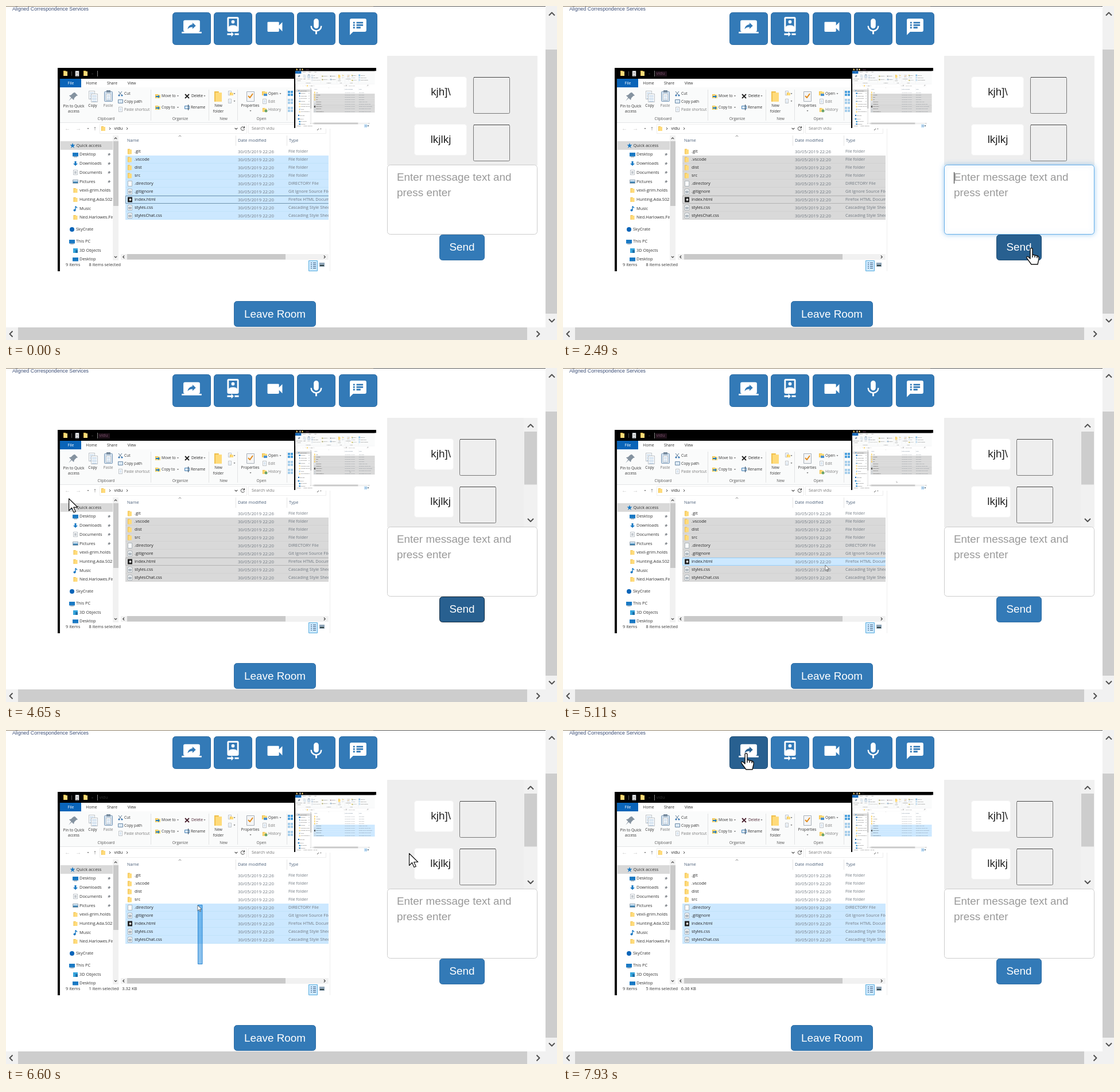
An HTML page with a canvas for the animation above (8000 ms loop, 960 by 583 pixels).

```html
<!DOCTYPE html>
<html lang="en">
<head>
<meta charset="utf-8">
<title>Room</title>
<style>
html, body { margin: 0; width: 100%; height: 100%; overflow: hidden; background: #fff; }
canvas { display: block; }
</style>
</head>
<body>
<canvas id="stage" width="960" height="583"></canvas>
<script>
const LOOP = 8000;
const PREVIEW_LEAD = 700; // the small preview runs ahead of the streamed picture
const ctx = document.getElementById('stage').getContext('2d');
const UI = '"Open Sans", "Noto Sans", sans-serif';
const WEB = '"Liberation Sans", Arial, sans-serif';

// Pointer paths: time, x, y
const pointerPaths = [
  [[80, 548, 540], [300, 690, 500], [500, 790, 425], [650, 775, 370], [840, 741, 335],
   [1250, 741, 335], [1720, 830, 345], [2000, 872, 362], [2300, 835, 405], [2490, 816, 423],
   [2850, 816, 423], [3100, 780, 440], [3460, 715, 449], [3590, 707, 458], [3830, 699, 461],
   [4070, 694, 458], [4400, 330, 330], [4720, 49, 200]],
  [[6530, 640, 285], [6600, 702, 216], [6750, 784, 140], [6950, 700, 70], [7150, 560, 40],
   [7300, 430, 40], [7410, 380, 42], [7700, 325, 45], [7930, 319, 41], [8000, 319, 41]]
];
const streamPath = [[4950, 510, 322], [5110, 457, 344], [5400, 430, 352], [5810, 370, 412],
  [5980, 342, 409], [6100, 341, 409], [6550, 335, 306], [6650, 333, 306], [6900, 333, 306]];

function along(path, t) {
  const i = path.findIndex(k => k[0] > t);
  if (i < 1) return null;
  const [t0, x0, y0] = path[i - 1], [t1, x1, y1] = path[i];
  const p = (t - t0) / (t1 - t0);
  return { x: x0 + (x1 - x0) * p, y: y0 + (y1 - y0) * p };
}

function rect(x, y, w, h, fill) {
  ctx.fillStyle = fill;
  ctx.fillRect(x, y, w, h);
}

function box(x, y, w, h, fill, stroke, radius = 0, width = 1) {
  ctx.beginPath();
  ctx.roundRect(x + .5, y + .5, w - 1, h - 1, radius);
  if (fill) { ctx.fillStyle = fill; ctx.fill(); }
  if (stroke) { ctx.strokeStyle = stroke; ctx.lineWidth = width; ctx.stroke(); }
}

function disc(x, y, r, fill) {
  ctx.fillStyle = fill;
  ctx.beginPath();
  ctx.arc(x, y, r, 0, 7);
  ctx.fill();
}

function text(s, x, y, size, color, align = 'left', family = UI) {
  ctx.font = `${size}px ${family}`;
  ctx.fillStyle = color;
  ctx.textAlign = align;
  ctx.textBaseline = 'middle';
  ctx.fillText(s, x, y);
}

function shape(d, x, y, { scale = 1, sy = scale, fill, stroke, width = 1 }) {
  const path = new Path2D(d);
  ctx.save();
  ctx.translate(x, y);
  ctx.scale(scale, sy);
  ctx.lineJoin = 'round';
  ctx.lineWidth = width;
  if (fill) { ctx.fillStyle = fill; ctx.fill(path, 'evenodd'); }
  if (stroke) { ctx.strokeStyle = stroke; ctx.stroke(path); }
  ctx.restore();
}

const CHEVRON = { up: 'M-1 .5L0-.5 1 .5', down: 'M-1-.5L0 .5 1-.5', left: 'M.5-1L-.5 0 .5 1', right: 'M-.5-1L.5 0-.5 1' };
const chevron = (dir, x, y, r, color = '#505050', weight = 2) =>
  shape(CHEVRON[dir], x, y, { scale: r, stroke: color, width: weight / r });
const caret = (x, y) => shape('M-1.5-.8h3L0 1z', x, y, { fill: '#555' });

function folder(x, y, w = 7, h = 8) {
  rect(x, y, w * .6, h, '#f0c04c');
  rect(x + w * .15, y + h * .12, w * .85, h * .88, '#ffdb7a');
}

function sheet(x, y, w = 7, h = 9, lines = '#8db4d8') {
  box(x, y, w, h, '#fff', '#a0a8b0', 0, .7);
  for (let i = 3; i < h - 1; i += 2.5) rect(x + 2, y + i, w - 4, .7, lines);
}

// ---------- file window ----------
const FILES = [
  ['.git', 'File folder'], ['.vscode', 'File folder'], ['dist', 'File folder'], ['src', 'File folder'],
  ['.directory', 'DIRECTORY File'], ['.gitignore', 'Git Ignore Source File'],
  ['index.html', 'Firefox HTML Document'], ['styles.css', 'Cascading Style Sheet'],
  ['stylesChat.css', 'Cascading Style Sheet']
];
const PLACES = [
  ['Desktop', 259, 'screen'], ['Downloads', 275, 'down'], ['Documents', 290.5, 'sheet'], ['Pictures', 306.5, 'picture'],
  ['vexil-grim.holds', 322, 'folder'], ['Hunting.Ada.S02E0', 338, 'folder'], ['Music', 353.5, 'note'],
  ['Ned.Harlowes.Finn', 369, 'folder'], ['SkyCrate', 390, 'dot', 122], ['This PC', 411, 'screen', 122],
  ['3D Objects', 427, 'cube'], ['Desktop', 442, 'screen']
];

const BLUE = '#1979c4';
const placeIcons = {
  screen(x, y) { rect(x - 5, y - 3, 10, 6.5, BLUE); rect(x - 3, y + 3.8, 6, 1, '#789'); },
  down(x, y) { shape('M-1.5-4h3v4h2.5L0 4-4 0h2.5z', x, y, { fill: BLUE }); },
  sheet(x, y) { sheet(x - 4, y - 4.5, 8, 9, '#456'); },
  picture(x, y) { box(x - 5, y - 3.5, 10, 7, '#cfe6f7', '#789', 0, .7); rect(x - 4, y, 8, 2.5, '#3a7fae'); },
  folder(x, y) { folder(x - 3.5, y - 4); },
  note(x, y) { shape('M0-4v7M0-4l3 3', x, y, { stroke: BLUE, width: 1.4 }); disc(x - 1.5, y + 3, 2, BLUE); },
  dot(x, y) { disc(x, y, 4, '#0a64b8'); },
  cube(x, y) { rect(x - 4, y - 4, 8, 8, '#35a4dc'); rect(x, y - 1, 4, 5, '#1c6fa8'); }
};

function streamState(t) {
  const focused = t < 150 || t > 5850;
  const drag = t > 5980 && t < 6900 ? along(streamPath, t) : null;
  let first = 1;
  if (t > 5850) first = t > 6550 ? 4 : drag ? Math.max(4, Math.floor((drag.y - 247) / 14)) : 9;
  let status = '8 items selected';
  if (t > 5850) status = t < 6250 ? '' : t < 7000 ? '1 item selected   3.32 KB' : '5 items selected   6.36 KB';
  return { focused, drag, first, status, hover: t > 4950 && t < 5300, cursor: along(streamPath, t) };
}

function drawRibbon(state) {
  rect(94, 142, 520, 61, '#fafbfb');
  rect(94, 203, 520, 1, '#e3e5e7');
  rect(94, 127, 37, 15, '#0a64b8');
  text('File', 113, 135, 6.8, '#fff', 'center');
  [['Home', 149], ['Share', 185], ['View', 219]].forEach(([s, x]) => text(s, x, 135, 6.8, '#333', 'center'));
  [252, 353, 403, 489].forEach(x => rect(x, 146, 1, 54, '#e2e3e4'));
  const label = (s, x, y, color = '#333', align = 'center') => text(s, x, y, 6.6, color, align);
  const item = (s, x, y, color) => label(s, x, y, color, 'left');

  shape('M2-8l6 6-3 1-4 4-1 4-4-4-6 6 5-7-4-4 4-1 4-4z', 118, 158, { scale: .9, fill: '#8593a0' });
  label('Pin to Quick', 118, 175);
  label('access', 118, 184);
  sheet(144, 148, 11, 15);
  sheet(148, 153, 12, 15);
  label('Copy', 151, 174.5);
  box(171, 149, 15, 18, '#d3e2f0', '#7896b4', 1);
  rect(175, 147, 7, 4, '#7a8da0');
  sheet(174, 153, 9, 12);
  label('Paste', 178, 174.5, '#777');
  shape('M-3-4L2 2M3-4L-2 2', 199, 153, { stroke: '#5d7a94' });
  disc(197, 156, 1.6, '#3b78b4');
  disc(202, 156, 1.6, '#3b78b4');
  item('Cut', 206, 153);
  box(195, 163, 9, 7, '#dce9f5', '#6d8ba8');
  item('Copy path', 206, 167);
  sheet(196, 176, 7, 9);
  item('Paste shortcut', 206, 181, '#777');
  label('Clipboard', 174.5, 197, '#555');

  [['Move to', 157], ['Copy to', 177]].forEach(([s, y]) => {
    folder(260, y - 3, 9, 7);
    shape('M-3 0h4v-2l3 3-3 3v-2h-4z', 264, y, { fill: BLUE });
    item(s, 271, y);
    caret(299.5, y);
  });
  const cross = state.focused && state.first > 1 ? '#4a2230' : '#222';
  shape('M-3.5-3.5l7 7M3.5-3.5l-7 7', 315.5, 157.5, { stroke: cross, width: 1.8 });
  item('Delete', 323, 157, cross);
  caret(346, 157);
  box(311, 174, 9, 6, '#d7e8f7', '#4b83b4');
  rect(317, 172, 1, 10, '#345');
  item('Rename', 322, 177);
  label('Organize', 303.5, 197, '#555');

  folder(363, 149, 13, 18);
  label('New', 370, 174.5);
  label('folder', 370, 184);
  sheet(387, 148, 6, 8); folder(390, 151, 6, 5); caret(398, 153);
  sheet(387, 162, 6, 8); caret(398, 166);
  label('New', 379, 197, '#555');
  box(419, 149, 14, 18, '#f4f5f6', '#a8b0b8');
  shape('M-4 0l3 3 5-7', 426, 157, { stroke: '#e28a1c', width: 2 });
  label('Properties', 425.5, 174.5);
  caret(426, 183);
  folder(446, 149, 9, 7); rect(449, 153, 6, 4, '#4a90cf');
  item('Open', 457, 153); caret(478, 153);
  sheet(447, 162, 7, 9); item('Edit', 457, 167, '#777');
  folder(447, 178, 7, 7); disc(453, 183, 2.5, '#6ba36b'); item('History', 457, 181.5, '#777');
  label('Open', 445, 197, '#555');
  for (let i = 0; i < 12; i++)
    rect(491 + i % 2 * 5, 148 + (i >> 1) % 2 * 5 + (i >> 2) * 14, 4, 4, i < 4 ? '#4ba0dd' : '#a5cdea');
  item('Select all', 503, 153);
  item('Select none', 503, 167);
  item('Invert selection', 503, 181);
}

function drawPlaces() {
  rect(95, 236, 91, 15, '#d9d9d9');
  shape('M0-5l1.3 3.6H5L2 1l1.2 4L0 2.5-3.2 5-2 1l-3-2.4h3.7z', 116, 243.5, { scale: .9, fill: BLUE });
  ctx.save();
  ctx.beginPath();
  ctx.rect(94, 225, 92, 221);
  ctx.clip();
  text('Quick access', 122.5, 244, 7.4, '#333');
  PLACES.forEach(([name, y, icon, x = 128], i) => {
    placeIcons[icon](x - 7, y);
    text(name, x, y + .5, 7.4, '#333');
    if (i < 4) shape('M0-3l3 3-2 1-1 2-1.5-1.5L-4 4l2-3-1.5-1.5 2-1z', 180, y, { scale: .8, fill: '#8a8f94' });
  });
  ctx.restore();
  rect(186, 226, 10, 218, '#f1f1f1');
  rect(187, 236, 9, 113, '#c9c9c9');
  chevron('up', 191, 231, 2.2, '#444', 1.2);
  chevron('down', 191, 438, 2.2, '#444', 1.2);
}

function drawFiles(state) {
  text('Name', 211, 235, 7.4, '#4c607a');
  text('Date modified', 404, 235, 7.5, '#4c607a');
  text('Type', 493, 235, 7.4, '#4c607a');
  chevron('up', 303, 227, 2.2, '#888', 1);
  rect(400, 226, 1, 18, '#e5e5e5');
  rect(489, 226, 1, 18, '#e5e5e5');
  FILES.forEach(([name, kind], i) => {
    const y = 254 + i * 14;
    if (i >= state.first) {
      rect(208, y - 7, 390, 14, state.focused ? '#cce8ff' : '#d9d9d9');
      rect(208, y + 6.5, 390, .5, state.focused ? '#b5daf5' : '#c8c8c8');
    }
    if (i === 6 && state.hover) box(208, y - 7, 390, 14, '#cce8ff', '#99d1ff');
    else if (i === 6 && state.first === 1)
      box(208, y - 7, 390, 14, null, state.focused ? '#6f93ad' : '#b4b4b4');
    if (i < 4) folder(212, y - 4.5, 7, 9);
    else if (i === 6) { rect(212, y - 4.5, 8, 9, '#222'); disc(216.5, y, 2, '#ddd'); }
    else {
      box(212, y - 5, 8, 10, '#fff', '#9aa5ad', 0, .8);
      if (i > 4) { disc(216, y + .5, 2.3, '#7b8b98'); disc(216, y + .5, 1, '#fff'); }
    }
    text(name, 224, y + .5, 7.4, '#222');
    text(`30/05/2019 22:2${i ? 0 : 6}`, 404, y + .5, 7.75, '#707880');
    text(kind, 492, y + .5, 7.4, '#707880');
  });
  rect(200, 433, 362, 10, '#f1f1f1');
  rect(211, 433, 276, 9.5, '#c9c9c9');
  chevron('left', 205, 438, 2.4, '#444', 1.2);
  chevron('right', 555, 438, 2.4, '#444', 1.2);
}

function drawWindow(t, right) {
  const state = streamState(t);
  ctx.save();
  ctx.beginPath();
  ctx.rect(90, 108, 555, 19);
  ctx.rect(90, 108, right - 90, 355);
  ctx.clip();
  rect(90, 108, 555, 355, '#fff');
  rect(90, 108, 4, 355, '#0b0b0b');
  rect(90, 108, 555, 19, '#000');
  folder(100, 113, 7, 9);
  rect(114, 114, 1, 8, '#555');
  sheet(120.5, 113, 7, 10, '#333');
  folder(135, 113, 7, 9);
  rect(149, 118, 3, 1, '#333');
  rect(159, 113, 1, 10, '#888');
  if (!state.focused) rect(161, 114, 20, 9, '#20121b');
  if (t > 100) text('vidu', 162.5, 118, 7.6, state.focused ? '#303030' : '#765069');

  drawRibbon(state);
  text('←', 107, 214, 10, '#c5c5c5', 'center');
  text('→', 126, 214, 10, '#c5c5c5', 'center');
  caret(143, 214);
  text('↑', 155, 214, 10, '#444', 'center');
  box(163, 206, 257, 17, null, '#ededed');
  folder(166, 210, 7, 8);
  chevron('right', 181, 214, 2, '#444', 1);
  text('vidu', 188.5, 214, 7.5, '#222');
  chevron('right', 211, 214, 2, '#444', 1);
  chevron('down', 401, 214, 2.4, '#444', 1.1);
  shape('M2.5-2A3.2 3.2 0 1 0 3 1M3-4v3H0', 412.5, 214, { stroke: '#444' });
  box(422, 206, 136, 17, null, '#ededed');
  text('Search vidu', 428, 214, 7.4, '#777');
  shape('M-4 4l4-4a2.5 2.5 0 1 1 1 1', 546, 213, { stroke: '#555' });

  drawPlaces();
  drawFiles(state);
  text('9 items', 104, 452, 7.4, '#333');
  text(state.status, 144.5, 452, 7.4, '#333');
  box(527, 444, 16, 19, '#cce8ff', '#5aaede');
  for (let y = 448; y < 460; y += 3) { rect(531, y, 2, 1, '#357'); rect(535, y, 5, 1, '#357'); }
  rect(546, 448, 9, 7, '#8fa5b8');
  rect(547, 452, 7, 2, '#344');

  if (state.drag) {
    const { x, y } = state.drag;
    box(x, y - 1, Math.max(1, 342.5 - x), Math.max(1, 410 - y), 'rgba(0,120,215,.45)', '#2b87d3');
  }
  if (state.cursor) drawArrow(state.cursor.x, state.cursor.y, .46);
  ctx.restore();
}

function drawPreview(t) {
  ctx.save();
  ctx.beginPath();
  ctx.rect(502, 108, 143, 106);
  ctx.clip();
  rect(502, 108, 143, 106, '#fff');
  ctx.translate(503, 108);
  ctx.scale(.278, .294);
  ctx.translate(-90, -108);
  drawWindow(Math.min(t + PREVIEW_LEAD, LOOP - 1), 592);
  ctx.restore();
  rect(502, 108, 2, 105, '#000');
}

// ---------- web page ----------
const ICONS = [
  'M4 4h16q2 0 2 2v10q0 2-2 2H4q-2 0-2-2V6q0-2 2-2zM0 18h24v2H0zM13 14.5v-2.2q-4 0-6 2.7 .8-5.2 6-5.9V7l4 3.7z',
  'M7 0h10q2 0 2 2v14q0 2-2 2H7q-2 0-2-2V2q0-2 2-2zM7 2v10.5q0-2.5 5-2.5t5 2.5V2zM12 4a2 2 0 0 1 0 4a2 2 0 0 1 0-4zM10 20H5v2h5v2l3-3-3-3zM14 20h5v2h-5z',
  'M4 6h12q1 0 1 1v3.5l4-4v11l-4-4V17q0 1-1 1H4q-1 0-1-1V7q0-1 1-1z',
  'M9 5a3 3 0 0 1 6 0v6a3 3 0 0 1-6 0zM6.7 11a5.3 5.1 0 0 0 10.6 0H19q-.5 6-6 6.7V21h-2v-3.3Q5.5 17 5 11z',
  'M4 2h16q2 0 2 2v12q0 2-2 2H6l-4 4V4q0-2 2-2zM6 6h2v2H6zM6 9h2v2H6zM6 12h2v2H6zM10 6h8v2h-8zM10 9h8v2h-8zM10 12h5v2h-5z'
];
const SEND = [755, 399, 79, 45];
const LEAVE = [397, 515, 143, 45];
const FIELD = [664, 277, 262, 122];
const TOOLS = ICONS.map((_, i) => [290 + Math.floor(i * 72.5), 11, 67, 57]);
const inside = (p, [x, y, w, h]) => p && p.x >= x && p.x < x + w && p.y >= y && p.y < y + h;

function button(area, dark, border = '#204d74') {
  box(...area, dark ? '#286090' : '#337ab7', dark ? border : '#2e6da4', 5);
}

function drawChat(t, pointer) {
  const scrolled = t > 2780;
  const focusIn = Math.min(1, Math.max(0, (t - 1100) / 150));
  const glow = t < 2750 ? focusIn : Math.max(0, 1 - (t - 2750) / 150);
  rect(664, 87, 262, 191, '#eee');
  ['kjh]\\', 'lkjlkj'].forEach((message, i) => {
    const y = 123 + i * 83;
    box(711, y, scrolled ? 69 : 92, 55, '#fff', '#f3f3f3', 4);
    text(message, scrolled ? 775 : 757.5, y + 28, 18.9, '#222', scrolled ? 'right' : 'center', WEB);
    const x = scrolled ? 790 : 814;
    box(x, y + 1, 64, 64, '#eee', '#777', 2);
    rect(x + 1, y + 1, 62, 1, '#444');
  });
  if (scrolled) {
    rect(902, 87, 24, 191, '#f1f1f1');
    rect(903, 111, 22, 92.5, '#cdcdcd');
    chevron('up', 914, 101, 5);
    chevron('down', 914, 265.5, 5);
  }
  ctx.save();
  ctx.shadowColor = `rgba(102,175,233,${.6 * glow})`;
  ctx.shadowBlur = 8 * glow;
  box(...FIELD, '#fff', glow > .5 ? '#66afe9' : '#ccc', 5);
  ctx.restore();
  text('Enter message text and', 681, 300, 18.9, '#999', 'left', WEB);
  text('press enter', 681, 327, 18.9, '#999', 'left', WEB);
  if (t > 1100 && t < 2750 && (t - 1100) % 1060 < 530) rect(681, 290, 1, 20, '#222');

  const sendFocused = t > 2750 && t < 4880;
  button(SEND, sendFocused || inside(pointer, SEND), sendFocused ? '#122b40' : undefined);
  text('Send', 794.5, 422, 18.9, '#fff', 'center', WEB);
}

function drawScrollbars() {
  rect(940, 0, 20, 583, '#f1f1f1');
  rect(940, 76, 20, 461, '#cdcdcd');
  chevron('up', 951, 14, 5);
  chevron('down', 951, 549, 5);
  rect(0, 561, 940, 22, '#f1f1f1');
  rect(21, 561, 887, 22, '#cdcdcd');
  chevron('left', 9, 572.5, 5);
  chevron('right', 927, 572.5, 5);
}

function drawArrow(x, y, scale = 1) {
  shape('M0 0v21l5-5 3.5 8 3.2-1.4L8.2 15h7z', x, y, { scale, fill: '#fff', stroke: '#111', width: 1.2 });
}

function drawPointer(p) {
  if (!p) return;
  if ([SEND, LEAVE, ...TOOLS].some(area => inside(p, area)))
    shape('M-2 1q2-3 4 0v10l8 2q4 1 3 6l-2 9H0l-8-11q-1-4 3-2l3 3zM2 11v5M6 12v4M10 13v4',
      p.x, p.y, { fill: '#fff', stroke: '#111', width: 1.4 });
  else if (inside(p, FIELD))
    shape('M-6-10h4q2 0 2 2 0-2 2-2h4M0-8V9M-6 11h4q2 0 2-2 0 2 2 2h4', p.x, p.y, { stroke: '#000', width: 2 });
  else drawArrow(p.x, p.y);
}

function draw(t) {
  const pointer = pointerPaths.map(path => along(path, t)).find(Boolean);
  rect(0, 0, 960, 583, '#fff');
  rect(0, 0, 640, 1, '#8f8068');
  rect(640, 0, 300, 1, '#5a5a58');
  text('Aligned Correspondence Services', 11, 5.5, 8.8, '#3e5078', 'left', WEB);
  TOOLS.forEach((area, i) => {
    button(area, inside(pointer, area));
    shape(ICONS[i], area[0] + 16.2, 19, { scale: 1.44, fill: '#fff' });
  });
  drawWindow(t, 562);
  rect(564, 214, 1, 249, '#eee');
  drawPreview(t);
  drawChat(t, pointer);
  button(LEAVE, inside(pointer, LEAVE));
  text('Leave Room', 468.5, 538.5, 18.9, '#fff', 'center', WEB);
  drawScrollbars();
  drawPointer(pointer);
}

const start = performance.now();
function frame() {
  draw((performance.now() - start) % LOOP);
  requestAnimationFrame(frame);
}
frame();
</script>
</body>
</html>
```
